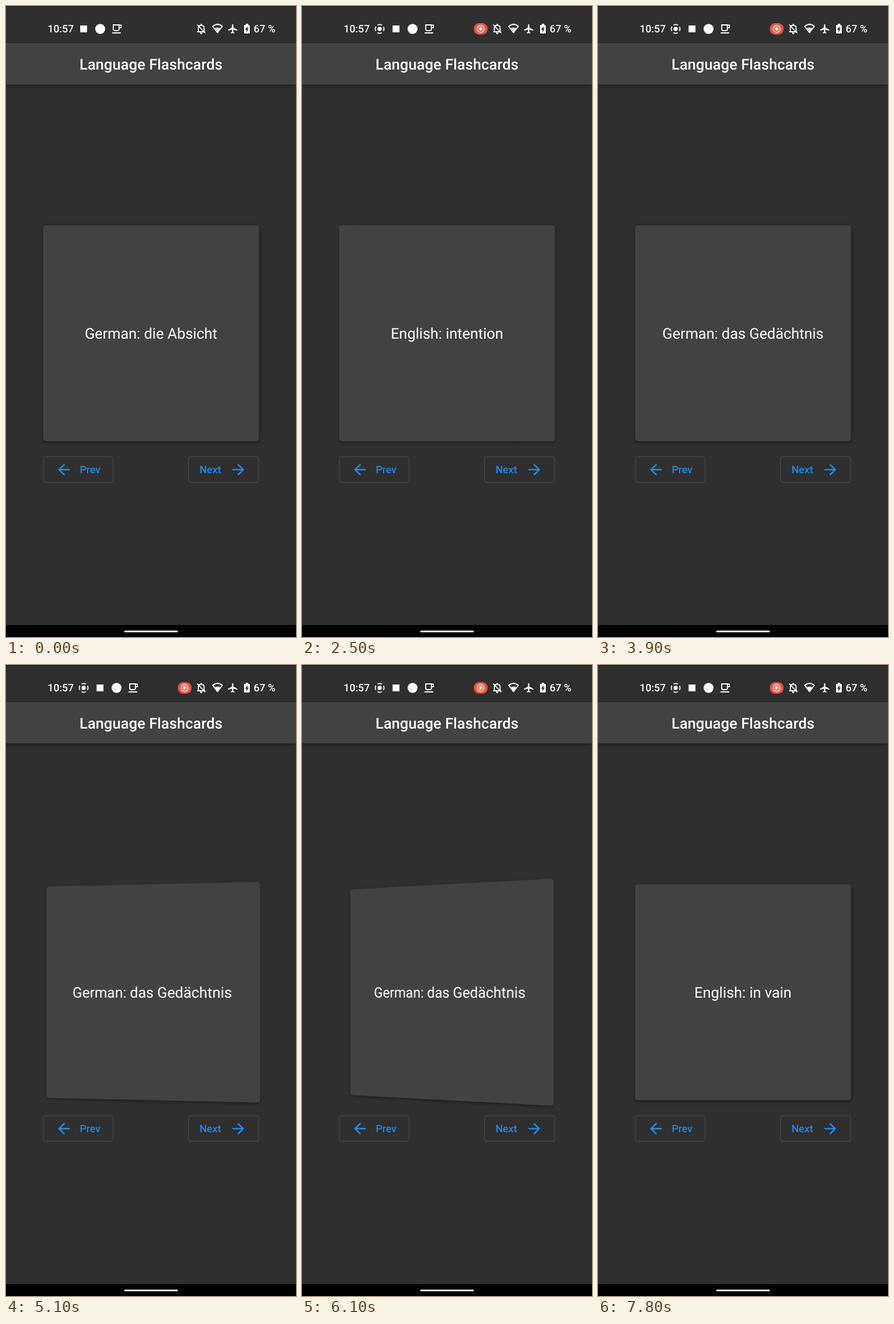
These frames come from a looping animation (508 px wide and 1102 px high, 8 s). An HTML page:

```html
<!DOCTYPE html>
<html lang="en">
<head>
<meta charset="utf-8">
<title>Language Flashcards</title>
<style>
  html, body { margin: 0; width: 100%; height: 100%; overflow: hidden; background: #2f2f2f; }
  #scene { position: absolute; left: 65px; top: 383px; width: 378px; height: 377px; perspective: 1305px; }
  #card {
    width: 100%; height: 100%; border-radius: 5px; background: #424242; color: #fff;
    font: 25.87px/381px Roboto, sans-serif; text-align: center; white-space: nowrap;
    text-rendering: geometricPrecision;
    box-shadow: 0 2px 4px -1px rgba(0,0,0,.2), 0 4px 5px rgba(0,0,0,.14), 0 1px 8px rgba(0,0,0,.12);
  }
  svg { position: absolute; left: 0; top: 0; }
  text { font: 500 18px Roboto, sans-serif; text-rendering: geometricPrecision; }
  .bar { fill: #424242; filter: drop-shadow(0 2px 3px rgba(0,0,0,.4)); }
  .line { fill: none; stroke: #fff; stroke-width: 1.8; }
  .button { fill: #2078f3; fill-opacity: 0; stroke: #434343; stroke-width: 1.3; }
  .blue { fill: #1e8ae8; }
  .blue text { font-size: 18.1px; }
</style>
</head>
<body>
<div id="scene"><div id="card"></div></div>
<svg width="508" height="1102" viewBox="0 0 508 1102" fill="#fff">
  <rect width="508" height="1" fill="#1c1c1c"/>
  <rect class="bar" y="65" width="508" height="72"/>
  <text x="254" y="110.6" text-anchor="middle" style="font-size:26px;letter-spacing:.1px">Language Flashcards</text>

  <!-- status bar, left -->
  <text x="73" y="46">10:57</text>
  <g id="record">
    <circle class="line" cx="136" cy="40" r="7.6" stroke-width="1.6" stroke-dasharray="8 3.94" stroke-dashoffset="4"/>
    <circle cx="136" cy="40" r="3.8"/>
  </g>
  <g id="notes">
    <rect x="130" y="34" width="12" height="12"/>
    <circle cx="165" cy="40" r="8.7"/>
    <path class="line" d="M188 33H198V40.5Q198 43 195.5 43H190.5Q188 43 188 40.5ZM198 33.5H201.5V38H198M186 47H201"/>
  </g>

  <!-- status bar, right -->
  <g id="chip">
    <rect x="301" y="30" width="24" height="20" rx="9" fill="#ea5540"/>
    <circle class="line" cx="313" cy="40" r="6" style="stroke-width:1.4"/>
    <circle cx="313" cy="40" r="3"/>
  </g>
  <path class="line" d="M337 44.5V38.5Q337 34 342 33.5Q347 34 347 38.5V44.5M335 45H349M342 31V34M335 32.5L349 47.5"/>
  <circle cx="342" cy="47.5" r="1.8"/>
  <path class="line" d="M362 35.5Q370.5 28.5 379 35.5L370.5 46.5Z" stroke-linejoin="round"/>
  <path d="M364.5 39.5Q370.5 36 376.5 39.5L370.5 47Z"/>
  <path transform="translate(397 40) scale(.8) translate(-12 -12)" d="M22 16v-2l-8.5-5V3.5c0-.83-.67-1.5-1.5-1.5s-1.5.67-1.5 1.5V9L2 14v2l8.5-2.5V19L8 20.5V22l4-1 4 1v-1.5L13.5 19v-5.5z"/>
  <path d="M420 31H424V33H425.5Q427 33 427 34.5V46.5Q427 48 425.5 48H418.5Q417 48 417 46.5V34.5Q417 33 418.5 33H420Z"/>
  <path fill="#2f2f2f" d="M423 35L419 41.5H421.5V46L425 39.5H423Z"/>
  <text x="472" y="46" text-anchor="end">67 %</text>

  <!-- buttons -->
  <rect class="button" x="65.5" y="787" width="122" height="45" rx="4.5"/>
  <rect class="button" id="next" x="319.5" y="787" width="123" height="45" rx="4.5"/>
  <g class="blue">
    <path transform="translate(86 794.3) scale(1.293)" d="M20 11H7.83l5.59-5.59L12 4l-8 8 8 8 1.41-1.41L7.83 13H20z"/>
    <text x="129.2" y="816">Prev</text>
    <text x="339" y="816">Next</text>
    <path transform="translate(391.5 794.3) scale(1.293)" d="M12 4l-1.41 1.41L16.17 11H4v2h12.17l-5.58 5.59L12 20l8-8z"/>
  </g>

  <!-- navigation bar -->
  <rect y="1081" width="508" height="21" fill="#000"/>
  <rect x="207" y="1090.8" width="94" height="3" rx="1.5" fill="#e6e6e6"/>
</svg>
<script>
const LOOP = 8000, FLIP = 485;
const flips = [1190, 2494, 5040, 5715, 7210];   // alternately to the back and to the front
const presses = [3460, 6560];
const words = [['die Absicht', 'intention'], ['das Gedächtnis', 'memory'], ['umsonst', 'in vain']];
const [card, record, notes, chip, next] =
  ['card', 'record', 'notes', 'chip', 'next'].map(id => document.getElementById(id));

const clamp = v => Math.min(1, Math.max(0, v));
const smooth = v => v * v * (3 - 2 * v);

// cubic-bezier(.42, 0, 1, 1)
function easeIn(x) {
  let lo = 0, hi = 1;
  for (let i = 0; i < 20; i++) {
    const s = (lo + hi) / 2, r = 1 - s;
    if (1.26 * r * r * s + 3 * r * s * s + s * s * s < x) lo = s; else hi = s;
  }
  return smooth(lo);
}

function drawCard(t) {
  const turn = flips.reduce((sum, start, i) => sum + (i % 2 ? -1 : 1) * clamp((t - start) / FLIP), 0);
  const back = turn >= .5;
  const angle = back ? 90 * easeIn(2 - 2 * turn) : -90 * easeIn(2 * turn);
  const word = words[presses.filter(start => t >= start + 90).length];
  const label = back ? 'English: ' + word[1] : 'German: ' + word[0];
  if (card.textContent !== label) card.textContent = label;
  card.style.transform = Math.abs(angle) < .01 ? 'none' : `rotateY(${angle}deg)`;
}

function drawStatus(t) {
  const k = smooth(clamp((t - 60) / 400));
  notes.setAttribute('transform', `translate(${28.7 * k} 0)`);
  record.setAttribute('opacity', k);
  chip.setAttribute('opacity', k);
  chip.setAttribute('transform', `translate(313 40) scale(${k}) translate(-313 -40)`);
}

function drawPress(t) {
  const glow = presses.map(start => {
    const u = t - start;
    return .14 * smooth(clamp(u / 170)) * (1 - smooth(clamp((u - 250) / 230)));
  });
  next.style.fillOpacity = Math.max(...glow);
}

function frame(now) {
  const t = now % LOOP;
  drawCard(t);
  drawStatus(t);
  drawPress(t);
  requestAnimationFrame(frame);
}
frame(0);
</script>
</body>
</html>
```
